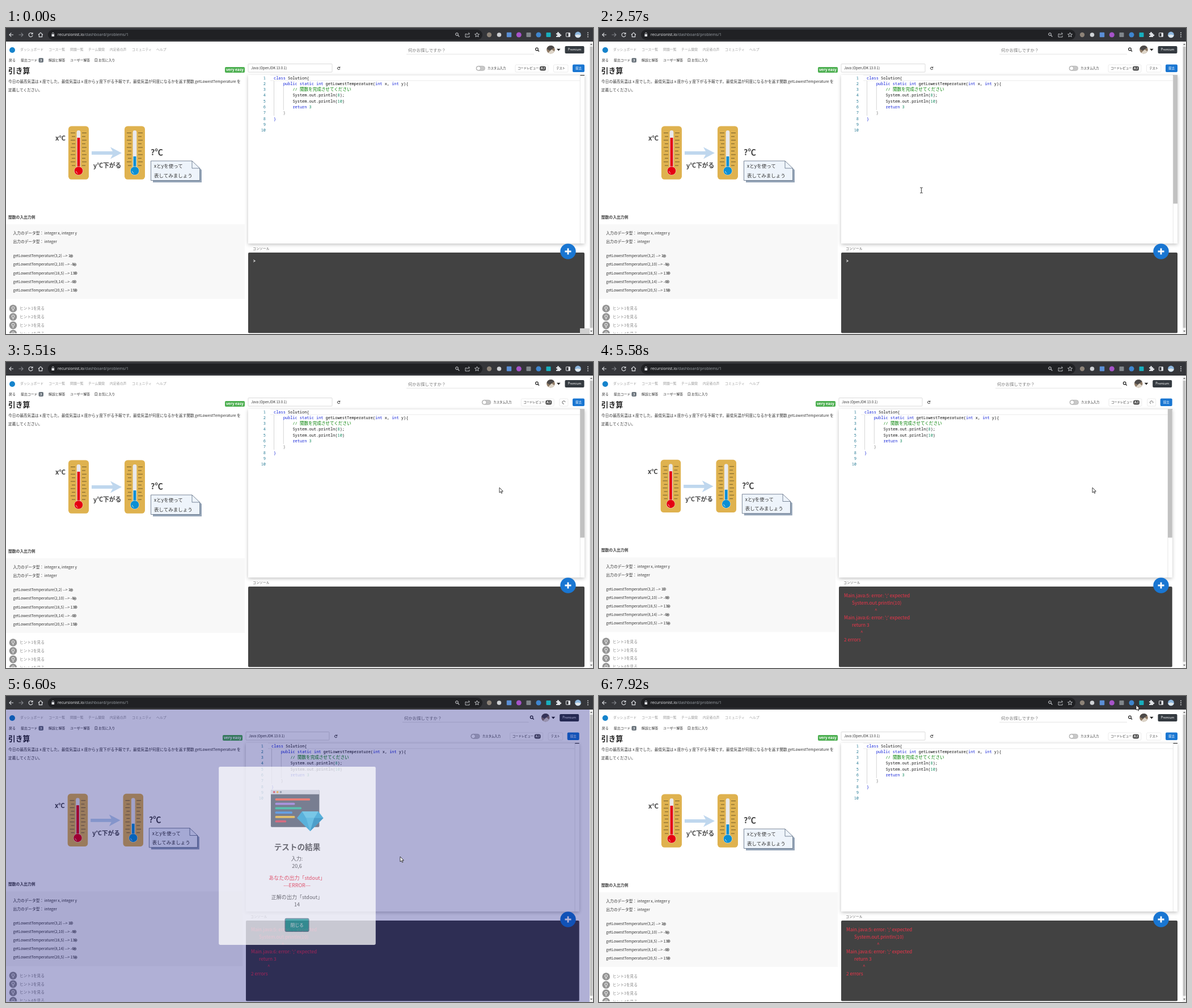
Animation of 1035x541 px, one loop 7990 ms. Source, as an HTML page:

```html
<!DOCTYPE html>
<html>
<head>
<meta charset="utf-8">
<title>引き算</title>
<style>
html, body { margin: 0; width: 100%; height: 100%; overflow: hidden; background: #fff; }
svg { display: block; width: 1035px; height: 541px; }
text { font-family: 'Noto Sans CJK JP', 'Noto Sans CJK', sans-serif; white-space: pre; }
.mono text { font-family: 'Noto Sans Mono', 'DejaVu Sans Mono', monospace; }
.url { font-family: 'Open Sans', 'Noto Sans', sans-serif; }
.mid { text-anchor: middle; }
.end { text-anchor: end; }
.bold { font-weight: 700; }
</style>
</head>
<body>
<svg id="stage" viewBox="0 0 1035 541"></svg>
<script>
const LOOP = 7990;
const BLUE = '#1976d2', RED = '#f0344a', INK = '#333', SOFT_INK = '#444';

// Drawing helpers; text is placed by its vertical centre.
const text = (x, y, s, size, fill = INK, cls = '') =>
  `<text x="${x}" y="${y + size * 0.37}" font-size="${size}" fill="${fill}" class="${cls}">${s}</text>`;
const rect = (x, y, w, h, fill, rx = 0, extra = '') =>
  `<rect x="${x}" y="${y}" width="${w}" height="${h}" fill="${fill}" rx="${rx}" ${extra}/>`;
const circle = (x, y, r, fill, extra = '') =>
  `<circle cx="${x}" cy="${y}" r="${r}" fill="${fill}" ${extra}/>`;
const shape = (d, fill, extra = '') => `<path d="${d}" fill="${fill}" ${extra}/>`;
const line = (d, stroke, w = 1, extra = '') =>
  `<path d="${d}" fill="none" stroke="${stroke}" stroke-width="${w}" ${extra}/>`;
const group = (attrs, ...parts) => `<g ${attrs}>${parts.join('')}</g>`;
const move = (x, y, ...parts) => group(`transform="translate(${x} ${y})"`, ...parts);
const border = c => `stroke="${c}" stroke-width=".7"`;

function browserBar() {
  const pale = '#dfe1e5';
  return [
    rect(0, 0, 1035, 24, '#35363a'),
    rect(74, 3, 766, 18, '#202124', 9),
    line('M13 12H6M9.3 8.6L5.9 12L9.3 15.4', pale, 1.1),
    line('M22.5 12H30M26.7 8.6L30.1 12L26.7 15.4', '#83868b', 1.1),
    line('M46.3 9.8A3.5 3.5 0 1 0 47 13M47 8V10.8H44.2', pale, 1.1),
    line('M57 12L61 8.2L65 12M58.3 11.2V15.6H63.7V11.2', pale, 1.1),
    rect(80.5, 11, 4.6, 4, pale, 0.5), line('M81.4 11V9.7a1.4 1.4 0 0 1 2.8 0V11', pale, 0.8),
    text(91, 11.8, 'recursionist.io<tspan fill="#9aa0a6">/dashboard/problems/1</tspan>', 7.05, '#e8eaed', 'url'),
    circle(795, 11, 2.3, 'none', `stroke="${pale}"`), line('M796.8 12.8L799.3 15.3', pale, 1.1),
    line('M812.5 10.5H810V16H817V13.5M812.5 13C813 10.7 815 10 817 10M815.3 8L817.5 10L815.3 12', pale, 0.8),
    line('M830.5 8L831.6 10.8L834.5 11L832.2 12.9L833 15.7L830.5 14.1L828 15.7L828.8 12.9L826.5 11L829.4 10.8Z', pale, 0.8),
    circle(852, 12, 4.2, '#8d8378'), circle(869.5, 12, 3.8, '#cfd2d6'),
    rect(882.8, 7.8, 8.4, 8.4, '#5b8fd6', 1), circle(904.3, 12, 4.5, '#a653c9'),
    rect(917.5, 8, 8, 8, '#80868b', 1), circle(939, 12, 4.5, '#3f86cf'), rect(952.5, 8, 8, 8, '#18aebd', 1),
    shape('M970 9.2H972.2a1.5 1.5 0 1 1 2.6 0H977V11.4a1.5 1.5 0 1 1 0 2.6V16H970V13.8a1.4 1.4 0 1 0 0-2.4Z', pale),
    rect(987.5, 8.7, 7, 6.6, 'none', 0.5, `stroke="${pale}"`), rect(991.5, 8.7, 3, 6.6, pale),
    circle(1008.5, 12, 5.4, '#8db6dd'), shape('M1003.3 13Q1008 10 1013.7 13A5.4 5.4 0 0 1 1003.3 13Z', '#dfe6ea'),
    ...[8.5, 12, 15.5].map(y => circle(1026, y, 0.9, pale)),
    rect(1029, 24, 6, 517, '#f1f1f1'), rect(1029.7, 33, 4.6, 497, '#c1c1c1'),
    shape('M1030 30L1032 27.5L1034 30Z', '#666'), shape('M1030 535L1032 537.5L1034 535Z', '#666')
  ].join('');
}

function header(b) {
  const nav = [[25, 'ダッシュボード'], [75, 'コース一覧'], [113, '問題一覧'], [145, 'チーム開発'],
    [183, '内定者の声'], [222, 'コミュニティ'], [265, 'ヘルプ']];
  const tabs = [[5, '戻る'], [26, '提出コード'], [75, '解説と解答'], [113, 'ユーザー解答'], [163, 'お気に入り']];
  return [
    circle(11, 39, 5, '#1583cc'),
    ...nav.map(([x, s]) => text(x, 38.3, s, 5.88, '#9a9a9a')),
    ...tabs.map(([x, s]) => text(x, 57, s, 5.88)),
    rect(57.5, 53, 8.5, 8, '#6c757d', 2), text(61.8, 57, '3', 5.4, '#fff', 'mid bold'),
    line('M157 54.2H160.6V59.8L158.8 58.2L157 59.8Z', INK, 0.7),
    text(709 + b * 0.75, 38.8, '何かお探しですか？', 7.4, '#777'),
    line(`M${706 + b * 0.75} 46.3H${931 + b}`, '#ddd', 0.8),
    move(b, 0,
      circle(936, 37.5, 2.3, 'none', 'stroke="#222" stroke-width="1.2"'), line('M937.7 39.2L940 41.5', '#222', 1.4),
      circle(960.5, 38.2, 7.3, '#8f7b66'), shape('M953.4 37A7.3 7.3 0 0 1 966.8 34.5L959 40Z', '#4d4a49'),
      shape('M956 43.9L962 38L967 41.5A7.3 7.3 0 0 1 956 43.9Z', '#ded5c8'),
      shape('M971 36.8H977.6L974.3 40.4Z', '#222'),
      rect(985.5, 32, 34, 13, '#343a40', 2), text(1002.5, 38.4, 'Premium', 5.5, '#fff', 'mid'))
  ].join('');
}

function thermometer(x, color, level) {
  let ticks = '';
  for (let i = 0; i < 10; i++) {
    const y = 185.5 + i * 6.4, len = i % 2 ? 6 : 8;
    ticks += `M${x + 12 - len} ${y}h${len}M${x + 24} ${y}h${len}`;
  }
  return [
    rect(x, 173.4, 36, 94.4, '#dfb24f', 5.5), line(ticks, '#57471f', 0.8),
    rect(x + 14.6, 181, 6.8, 70, '#e9e9ec', 3.4), rect(x + 15.6, level, 4.8, 252 - level, color),
    circle(x + 18, 252.5, 7.9, '#f0e3c4'), circle(x + 18, 252.5, 7.3, color),
    line(`M${x + 13.5} 253a4.5 4.5 0 0 0 3 4`, '#fff', 1, 'opacity=".7"')
  ].join('');
}

const illustration = () => [
  thermometer(110, '#e50012', 194), thermometer(209, '#0a8fd4', 227),
  shape('M151 218H188L184 210.5L204 221L184 231.5L188 224H151Z', '#bfd7ee'),
  text(87, 194.8, 'x℃', 11.5, SOFT_INK, 'bold'), text(154, 243.5, 'y℃下がる', 10.8, SOFT_INK, 'bold'),
  text(255, 220, '?℃', 14.4, SOFT_INK, 'bold'),
  shape('M259 238.5H331L345 251V273H259Z', '#95a5b8'),
  shape('M255.5 235H328L341.7 248V269.5H255.5Z', '#eef4fb', border('#46566d')),
  line('M328 235V248H341.7', '#46566d', 0.7),
  text(261, 244, 'xとyを使って', 8.5), text(261, 260.5, '表してみましょう', 8.5)
].join('');

function problem(small, a) {
  const samples = [['3,2', '1', 115.3], ['2,10', '-8', 121.3], ['18,5', '13', 122.8], ['8,14', '-6', 121.3], ['20,5', '15', 122.8]];
  const hint = (_, i) => {
    const y = 496 + i * 14.8;
    return circle(12.5, y, 6.8, '#949494') + circle(12.5, y - 1, 2.3, 'none', 'stroke="#fff" stroke-width=".9"') +
      line(`M11.3 ${y + 2.6}h2.4M11.7 ${y + 4}h1.6`, '#fff', 0.8) + text(24, y, `ヒント${i + 1}を見る`, 6.72, '#888');
  };
  return [
    text(4, 75.3, '引き算', 12.8, '#222', 'bold'),
    rect(386 + a, 69, 35, 10, '#4caf50', 2), text(403.5 + a, 73.8, 'very easy', 6.7, '#fff', 'mid bold'),
    text(4, 95, '今日の最高気温は x 度でした。最低気温は x 度から y 度下がる予報です。最低気温が何度になるかを返す関数 getLowestTemperature を', 6.72),
    text(4, 110, '定義してください。', 6.72),
    group(`transform="${small ? 'translate(0 1.5) scale(.988)' : ''}"`, illustration()),
    group(`transform="translate(0 ${small ? -1.6 : 0})"`,
      text(4, 334.2, '関数の入出力例', 6.8, SOFT_INK, 'bold'),
      rect(0, 347, 421 + a, 132, '#f8f8f8'),
      text(12.5, 363, '入力のデータ型： integer x, integer y', 6.72), text(12.5, 378, '出力のデータ型： integer', 6.72),
      ...samples.map(([args, out, x], i) => {
        const y = 402.8 + i * 15.15;
        return text(12.5, y, `getLowestTemperature(${args}) --> ${out}`, 6.72) +
          circle(x, y + 0.3, 2.4, 'none', 'stroke="#333" stroke-width=".7"') + circle(x, y + 0.3, 1.1, INK);
      }),
      ...[0, 1, 2, 3].map(hint))
  ].join('');
}

function controls() {
  const options = [
    rect(829, 67.3, 15.5, 8, '#c8c8c8', 4, border('#aaa')), circle(833.2, 71.3, 3.6, '#fff', border('#999')),
    text(849, 71.3, 'カスタム入力', 5.4),
    rect(898, 65, 58, 13, '#fff', 2, border('#e4e4e4')), text(902, 71.5, 'コードレビュー', 5.35),
    rect(941, 67.6, 11, 8, '#555', 3), text(946.5, 71.5, 'A.I', 5.4, '#fff', 'mid bold')
  ].join('');
  return group('class="idle"', options,
      rect(965.5, 65, 25.5, 13, '#fff', 2, border('#e4e4e4')), text(978.2, 71.5, 'テスト', 5.35, INK, 'mid')) +
    group('class="busy"', move(10.3, 0, options), rect(976, 65, 15, 13, '#fff', 2, border('#e4e4e4')),
      move(983.5, 71.5, line('M1.9 -1.9A2.7 2.7 0 1 1 -1.9 -1.9', '#555', 0.8, 'class="spin"'))) +
    rect(999, 64.5, 21, 13.5, BLUE, 2) + text(1009.5, 71.5, '提出', 5.4, '#fff', 'mid');
}

function codeLines() {
  const kw = s => `<tspan fill="#1222d8">${s}</tspan>`, num = s => `<tspan fill="#098658">${s}</tspan>`;
  const code = [
    [0, kw('class') + ' Solution{'],
    [1, kw('public static int') + ` getLowestTemperature(${kw('int')} x, ${kw('int')} y){`],
    [2, '<tspan fill="#008000">// <tspan font-family="Noto Sans CJK JP, sans-serif" font-size="7.58">関数を完成させてください</tspan></tspan>'],
    [2, `System.out.println(${num(8)});`], [2, `System.out.println(${num(10)})`],
    [2, `${kw('return')} ${num(3)}`], [1, '<tspan fill="#777">}</tspan>'], [0, kw('}')], [0, ''], [0, '']
  ];
  return group('class="mono"', ...code.map(([indent, s], i) => {
    const y = 88 + i * 10.3;
    return text(458, y, i + 1, 6.95, '#237893', 'end') + text(472 + indent * 16.7, y, s, 6.95, '#111');
  }));
}

function workspace(a, b) {
  const w = 593 + b - a, x = 427 + a;
  const errors = [[0, "Main.java:5: error: ';' expected"], [14, 'System.out.println(10)'], [54, '^'],
    [0, "Main.java:6: error: ';' expected"], [14, 'return 3'], [29, '^'], [0, '2 errors']];
  return [
    rect(x, 63.5, 148 + (b - a) / 5, 14.5, '#fff', 1, border('#ccc')),
    text(432 + a, 71, 'Java (OpenJDK 13.0.1)', 6.05),
    move(586.5 + a * 1.25, 71.2, line('M1.6 -1.5A2.2 2.2 0 1 0 2.2 .8M2.3 -2.8V-.8H.3', '#222', 0.9)),
    move(b, 0, controls()),
    rect(x, 83, w, 298, '#fff', 0, 'filter="url(#soft)"'),
    line(`M${466 + a} 83.3H${1012 + b}M${466 + a} 93H${1012 + b}`, '#e6e6e6', 0.8),
    line(`M${1012.3 + b} 83V381`, '#ddd', 0.7), rect(1012.5 + b, 83, 7.5, 1.2, '#333'),
    group('class="thumb"', rect(1012.3 + b, 83, 7.7, 227.5, '#c1c1c1')),
    move(a, 0, line('M472.5 93.5V155M489.3 103.5V145', '#c4c4c4', 0.7), codeLines(),
      text(435, 390.3, 'コンソール', 5.9, '#555')),
    rect(x, 397, w, 142.5, '#424242', 2),
    group('class="prompt mono"', text(435.5 + a, 412.5, '>', 8, '#fff', 'bold')),
    group('class="errors"', ...errors.map(([dx, s], i) => text(436 + a + dx, 412.5 + i * 13.03, s, 8.34, RED))),
    circle(991, 395, 13.7, BLUE), line('M985.5 395H996.5M991 389.5V400.5', '#fff', 2.8)
  ].join('');
}

function page(id, small) {
  const a = small ? -4 : 0, b = small ? -9.3 : 0;
  return group(`id="${id}"`, header(b), problem(small, a), workspace(a, b), rect(0, 539.6, 1029, 2, '#fff'));
}

function modal() {
  const bars = [[69, '#ff7058'], [39, '#a98be3'], [52, '#3cc8a4'], [34, '#4c9be8'], [39, '#f7c544'], [22, '#e65563']];
  const rows = [[288, '入力:'], [302.5, '20,6'], [326, 'あなたの出力「stdout」', RED], [341, '---ERROR---', RED],
    [364, '正解の出力「stdout」'], [379, '14']];
  return [
    rect(359, 106.5, 309, 352, '#fff', 2.7),
    rect(461.5, 152.3, 95.5, 73.5, '#656d79', 2), shape('M461.5 161V154.3a2 2 0 0 1 2-2H555a2 2 0 0 1 2 2V161Z', '#dfe2e7'),
    circle(468, 156.7, 2.1, '#e65563'), circle(474.6, 156.7, 2.1, '#f5b13d'), circle(481, 156.7, 2.1, '#8f98a3'),
    ...bars.map(([w, c], i) => rect(470, 169.3 + i * 8.65, w, 4.2, c, 2.1)),
    shape('M523 195H555L565 208L539 234L513 208Z', '#3bb2dd'), shape('M523 195H555L547 208H531Z', '#66d0ee'),
    shape('M531 208H547L539 234Z', '#4fc3e8'), shape('M547 208H565L539 234Z', '#2b98c6'),
    text(513.5, 265, 'テストの結果', 15.2, '#545454', 'mid bold'),
    ...rows.map(([y, s, c = '#545454']) => text(513, y, s, 10.1, c, 'mid')),
    rect(489.7, 406.5, 46.6, 25.5, '#35aba6', 2.5, 'stroke="#6d8b9d" stroke-width="1.5"'),
    text(513, 419.5, '閉じる', 8.7, '#fff', 'mid')
  ].join('');
}

const pointers = {
  arrow: shape('M0 0V9L2.1 7.1L3.5 10.2L5 9.5L3.6 6.5H6.3Z', '#fff', 'stroke="#111" stroke-width=".8"'),
  beam: line('M-2.3 -4.7H-.5L0 -4.3L.5 -4.7H2.3M0 -4.3V4.3M-2.3 4.7H-.5L0 4.3L.5 4.7H2.3', '#222', 0.9),
  hand: shape('M-1 0Q0 -1.4 1 0V4L4.8 5V8.5L3.8 11H-.8L-3.6 6.8Q-3 5.4 -1 7Z', '#fff', 'stroke="#111" stroke-width=".8"')
};

const stage = document.getElementById('stage');
stage.innerHTML = `<defs><filter id="soft" x="-5%" y="-5%" width="110%" height="115%">
  <feDropShadow dx="0" dy="2" stdDeviation="3.2" flood-color="#000" flood-opacity=".24"/></filter></defs>` +
  rect(0, 0, 1035, 541, '#fff') + page('wide', false) + page('narrow', true) +
  group('id="corner"', rect(1012, 531, 18, 10, '#d0d0d0')) +
  group('id="shade"', rect(0, 24, 1029, 517, '#00007b')) + browserBar() +
  group('id="modal"', modal()) +
  group('id="pointer"', ...Object.entries(pointers).map(([k, s]) => group(`class="${k}"`, s)));

const parts = {};
for (const s of ['#wide', '#narrow', '#corner', '#shade', '#modal', '#pointer', '.idle', '.busy', '.spin',
  '.thumb', '.prompt', '.errors', '.arrow', '.beam', '.hand']) parts[s] = [...stage.querySelectorAll(s)];
const show = (s, on) => parts[s].forEach(e => e.style.display = on ? '' : 'none');
const set = (s, name, value) => parts[s].forEach(e => e.setAttribute(name, value));

// time, x, y, pointer used from that time on
const path = [
  [0, 1024, 548, 'arrow'], [70, 1020, 533, 'arrow'], [350, 980, 420, 'arrow'], [450, 955, 381, 'beam'],
  [810, 829, 356, 'beam'], [1750, 829, 356, 'beam'], [1820, 830, 356, 'beam'], [2220, 830, 356, 'beam'],
  [2570, 568.5, 287, 'beam'], [2590, 566, 286, 'beam'], [2660, 426, 255, 'arrow'], [2790, 121, 200, 'arrow'],
  [2990, 416, 150, 'arrow'], [3060, 440, 145, 'beam'], [3490, 981, 92, 'beam'], [3560, 980, 82, 'hand'],
  [3840, 978, 70, 'hand'], [4120, 978, 70, 'hand'], [4280, 960, 84, 'beam'], [4730, 870, 222, 'beam'],
  [5480, 870, 222, 'arrow'], [5800, 870, 222, 'arrow'], [6130, 695, 284, 'arrow'], [7140, 695, 284, 'beam'],
  [7560, 870, 82, 'arrow'], [7850, 948, 10, 'arrow'], [7920, 947, 16, 'arrow'], [LOOP, 947, 16, 'arrow']
];
const popScale = [[0, 0.7], [0.45, 1.05], [0.8, 0.95], [1, 1]];

// Linear blend of column c over rows sorted by their first column.
function blend(rows, v, c = 1) {
  const i = Math.max(1, rows.findIndex(r => r[0] >= v));
  const [p, q] = [rows[i - 1], rows[i]];
  return p[c] + (q[c] - p[c]) * (v - p[0]) / (q[0] - p[0]);
}
const ramp = (t, from, length) => Math.min(1, Math.max(0, (t - from) / length));

function render(t) {
  const x = blend(path, t, 1), y = blend(path, t, 2);
  const kind = path.filter(k => k[0] <= t).pop()[3];
  set('#pointer', 'transform', `translate(${x} ${y})`);
  for (const k in pointers) show('.' + k, k === kind);

  const narrow = t >= 5575 && t < 6735, busy = t >= 3990 && t < 5850;
  show('#wide', !narrow);
  show('#narrow', narrow);
  show('#corner', t < 70);
  show('.idle', !busy);
  show('.busy', busy);
  set('.spin', 'transform', `rotate(${t * 0.48 % 360})`);
  show('.prompt', t < 3990);
  show('.errors', t >= 5560);
  show('.thumb', x > 427 && x < 1020 && y > 83 && y < 381 && (t < 5900 || t >= 7140));

  const open = ramp(t, 5594, 300), close = ramp(t, 6570, 148);
  const scale = close ? 1 - close / 2 : blend(popScale, open);
  show('#modal', open > 0 && close < 1);
  set('#modal', 'opacity', (1 - close) ** 1.3);
  set('#modal', 'transform', `translate(513.5 282) scale(${scale}) translate(-513.5 -282)`);
  set('#shade', 'opacity', 0.4 * (ramp(t, 5585, 100) - ramp(t, 6578, 100)));
}

const start = performance.now();
(function tick() {
  render((performance.now() - start) % LOOP);
  requestAnimationFrame(tick);
})();
</script>
</body>
</html>
```
